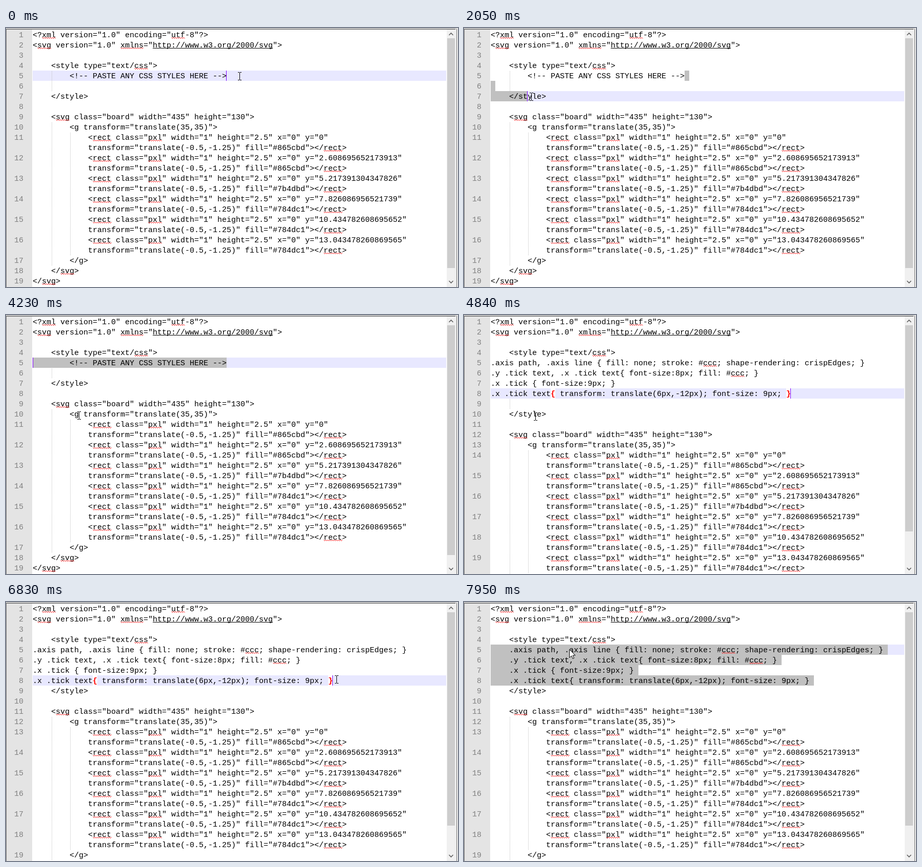
An HTML page with a canvas that plays this animation: 881x505 px, repeating every 8000 ms.

```html
<!DOCTYPE html>
<html lang="en">
<head>
<meta charset="utf-8">
<title>Editor</title>
<style>
html, body { margin: 0; width: 100%; height: 100%; overflow: hidden; background: #fff; }
canvas { display: block; }
</style>
</head>
<body>
<canvas id="stage" width="881" height="505"></canvas>
<script>
const ctx = document.getElementById('stage').getContext('2d');
const LOOP = 8000, LEFT = 52, RIGHT = 858, TOP = 3, CHAR = 9, ROW = 20, BASE = 15;
const FONT = '15px "Liberation Mono", "Courier New", monospace';
const URL_TEXT = 'http://www.w3.org/2000/svg';
const MISSPELT = /\b(xml|utf|svg|xmlns|css|pxl|rect|ccc)\b/g;

// Document text; a line may hold several wrapped rows
const head = [
  '<?xml version="1.0" encoding="utf-8"?>',
  `<svg version="1.0" xmlns="${URL_TEXT}">`,
  '',
  '    <style type="text/css">'
];
const note = '        <!-- PASTE ANY CSS STYLES HERE -->';
const blank = ' '.repeat(8);
const css = [
  '.axis path, .axis line { fill: none; stroke: #ccc; shape-rendering: crispEdges; }',
  '.y .tick text, .x .tick text{ font-size:8px; fill: #ccc; }',
  '.x .tick { font-size:9px; }',
  '.x .tick text{ transform: translate(6px,-12px); font-size: 9px; }'
];
const pad = ' '.repeat(12);
const fills = ['865cbd', '865cbd', '7b4dbd', '784dc1', '784dc1', '784dc1'];
const tail = [
  '    </style>',
  '',
  '    <svg class="board" width="435" height="130">',
  '        <g transform="translate(35,35)">',
  ...fills.map((fill, i) => [
    `${pad}<rect class="pxl" width="1" height="2.5" x="0" y="${i * 60 / 23}"`,
    `${pad}transform="translate(-0.5,-1.25)" fill="#${fill}"></rect>`
  ]),
  '        </g>',
  '    </svg>',
  '</svg>'
];

function layout(...lines) {
  return lines.flatMap((line, i) => [].concat(line).map((text, k) =>
    ({ text, num: k ? '' : String(i + 1), len: text.trimEnd().length })));
}

const template = layout(...head, note, blank, ...tail);
const pasted = layout(...head, ...css, blank, ...tail);
const joined = layout(...head, ...css, ...tail);
const indented = layout(...head, ...css.map(s => '    ' + s), ...tail);
const spot = (row, col) => ({ row, col });

// Between press and release the caret follows the mouse
const states = [
  { from: 0, rows: template, caret: spot(5, 42), anchor: spot(5, 42), press: 310, release: 3600 },
  { from: 4360, rows: pasted, caret: spot(8, 65) },
  { from: 5180, rows: pasted, caret: spot(9, 0) },
  { from: 5560, rows: joined, caret: spot(9, 0) },
  { from: 6830, rows: joined, anchor: spot(8, 65), press: 6830, release: 7580 },
  { from: 7850, rows: indented, caret: spot(5, 0), anchor: spot(9, 0) }
];

// Mouse moves: start, end, x, y
const moves = [
  [0, 0, 455, 93],
  [310, 1020, 198, 104],
  [1020, 1380, 114, 98],
  [1690, 2440, 150, 172],
  [2530, 2840, 166, 96],
  [2840, 2920, 117, 94],
  [2920, 3390, 13, 93],
  [3690, 4050, 142, 195],
  [4530, 4660, 139, 197],
  [6190, 6670, 655, 147],
  [6670, 6830, 644, 150],
  [6830, 7350, 14, 93],
  [7580, 7950, 205, 92]
];

function mouseAt(t) {
  let [, , x, y] = moves[0];
  for (const [start, end, toX, toY] of moves.slice(1)) {
    const p = Math.max(0, Math.min(1, (t - start) / (end - start)));
    const k = p * p * (3 - 2 * p);
    x += (toX - x) * k;
    y += (toY - y) * k;
  }
  return { x: Math.round(x), y: Math.round(y) };
}

const rowTop = row => TOP + (row - 1) * ROW;
const colX = col => LEFT + col * CHAR;

function hit(rows, { x, y }) {
  const row = Math.floor((y - TOP - 2) / ROW) + 1;
  const col = Math.round((x - LEFT) / CHAR);
  return spot(row, Math.max(0, Math.min(rows[row - 1].len, col)));
}

function caretAt(state, t) {
  if (!(t >= state.press)) return state.caret;
  const lag = 50;
  return hit(state.rows, mouseAt(Math.min(t, state.release) - lag));
}

function box(color, x, y, w, h) {
  ctx.fillStyle = color;
  ctx.fillRect(x, y, w, h);
}

function line(points, color, width) {
  ctx.strokeStyle = color;
  ctx.lineWidth = width;
  ctx.beginPath();
  points.forEach(([x, y]) => ctx.lineTo(x, y));
  ctx.stroke();
}

function squiggle(col, len, top) {
  const points = [];
  for (let x = 0; x <= len * CHAR; x += 2)
    points.push([colX(col) + x + 0.5, top + BASE + 0.5 + (x % 4 ? 2 : 0)]);
  line(points, '#f00', 1);
}

function drawFrame(rowCount) {
  // The thumb shrinks as the document grows
  const thumb = Math.round(448 * 26 / (rowCount + 1));
  box('#e4e4e4', 1, TOP, 50, 502);
  box('#f0f0f0', 859, TOP, 17, 502);
  box('#cdcdcd', 860, 20, 15, thumb);
  line([[863.5, 14], [867.5, 10], [871.5, 14]], '#606060', 1.6);
  line([[863.5, 493], [867.5, 497], [871.5, 493]], '#606060', 1.6);
  box('#f0f0f0', 0, 0, 881, 1);
  box('#a0a0a0', 0, 1, 877, 1);
  box('#696969', 0, 2, 876, 1);
  box('#696969', 0, 2, 1, 503);
  box('#e3e3e3', 876, 2, 1, 503);
  box('#696969', 878, 1, 1, 504);
  box('#f0f0f0', 879, 1, 2, 504);
}

function selection(rows, a, b) {
  const [from, to] = a.row < b.row || (a.row === b.row && a.col < b.col) ? [a, b] : [b, a];
  const spans = [];
  for (let row = from.row; row <= to.row; row++) {
    const start = row === from.row ? from.col : 0;
    const end = row === to.row ? to.col : rows[row - 1].len + 1;
    if (end > start) spans.push({ x: colX(start), y: rowTop(row), w: (end - start) * CHAR });
  }
  return spans;
}

function drawRow({ text, num }, top, checked) {
  const indent = text.length - text.trimStart().length;
  for (let c = 4; c < indent; c += 4)
    for (let y = 1; y < ROW; y += 2) box('#c0c0c0', colX(c) + 1, top + y, 1, 1);
  ctx.fillStyle = '#808080';
  ctx.textAlign = 'right';
  ctx.fillText(num, 34, top + BASE);
  ctx.fillStyle = '#000';
  ctx.textAlign = 'left';
  ctx.fillText(text.trimStart(), colX(indent), top + BASE);
  const link = text.indexOf(URL_TEXT);
  if (link >= 0) box('#000', colX(link), top + BASE + 1, URL_TEXT.length * CHAR, 1);
  const plain = text.replace(URL_TEXT, s => ' '.repeat(s.length));
  for (const m of plain.matchAll(MISSPELT))
    if (m[0] !== 'ccc' || checked) squiggle(m.index, m[0].length, top);
}

function drawBraces({ row }, text) {
  ctx.font = 'bold ' + FONT;
  for (const brace of '{}') {
    const x = colX(text.indexOf(brace));
    box('#fff', x, rowTop(row), CHAR, ROW);
    ctx.fillStyle = '#f00';
    ctx.fillText(brace, x, rowTop(row) + BASE);
  }
  ctx.font = FONT;
}

function drawBeam({ x, y }) {
  box('#000', x, y - 6, 1, 14);
  for (const edge of [y - 7, y + 8]) {
    box('#000', x - 3, edge, 3, 1);
    box('#000', x + 1, edge, 3, 1);
  }
}

function drawArrow({ x, y }, side) {
  const shape = [[0, 0], [0, 16], [4, 12.5], [6.5, 18], [9, 17], [6.5, 11.5], [11.5, 11.5]];
  ctx.beginPath();
  shape.forEach(([dx, dy]) => ctx.lineTo(x + 0.5 + dx * side, y + 0.5 + dy));
  ctx.closePath();
  ctx.fillStyle = '#fff';
  ctx.fill();
  ctx.strokeStyle = '#000';
  ctx.lineWidth = 1;
  ctx.stroke();
}

function drawMouse(mouse, spans, dragging) {
  const over = spans.some(s => mouse.x >= s.x && mouse.x < s.x + s.w &&
    mouse.y >= s.y && mouse.y < s.y + ROW);
  if (!dragging && mouse.x < LEFT) drawArrow(mouse, -1);
  else if (!dragging && over) drawArrow(mouse, 1);
  else drawBeam(mouse);
}

function draw(t) {
  const state = states.findLast(s => s.from <= t);
  const { rows, anchor } = state;
  const caret = caretAt(state, t);
  const dragging = t >= state.press && t < state.release;
  const blinkOff = !dragging && Math.floor((t - 150) / 300) % 2 === 0;
  const spans = anchor ? selection(rows, anchor, caret) : [];
  const caretTop = rowTop(caret.row);

  box('#fff', 0, 0, 881, 505);
  drawFrame(rows.length);
  ctx.font = FONT;
  box('#e8e8ff', LEFT, caretTop, RIGHT - LEFT, ROW);
  spans.forEach(s => box('#c0c0c0', s.x, s.y, s.w, ROW));
  rows.forEach((row, i) => drawRow(row, rowTop(i + 1), t >= 4840));

  const { text } = rows[caret.row - 1];
  if (!spans.length && caret.col && text[caret.col - 1] === '}') drawBraces(caret, text);
  if (!blinkOff) box('#8000ff', Math.max(LEFT, colX(caret.col) - 1), caretTop, 1, ROW);
  drawMouse(mouseAt(t), spans, dragging);
}

const began = performance.now();
function loop() {
  draw((performance.now() - began) % LOOP);
  requestAnimationFrame(loop);
}
loop();
</script>
</body>
</html>
```
